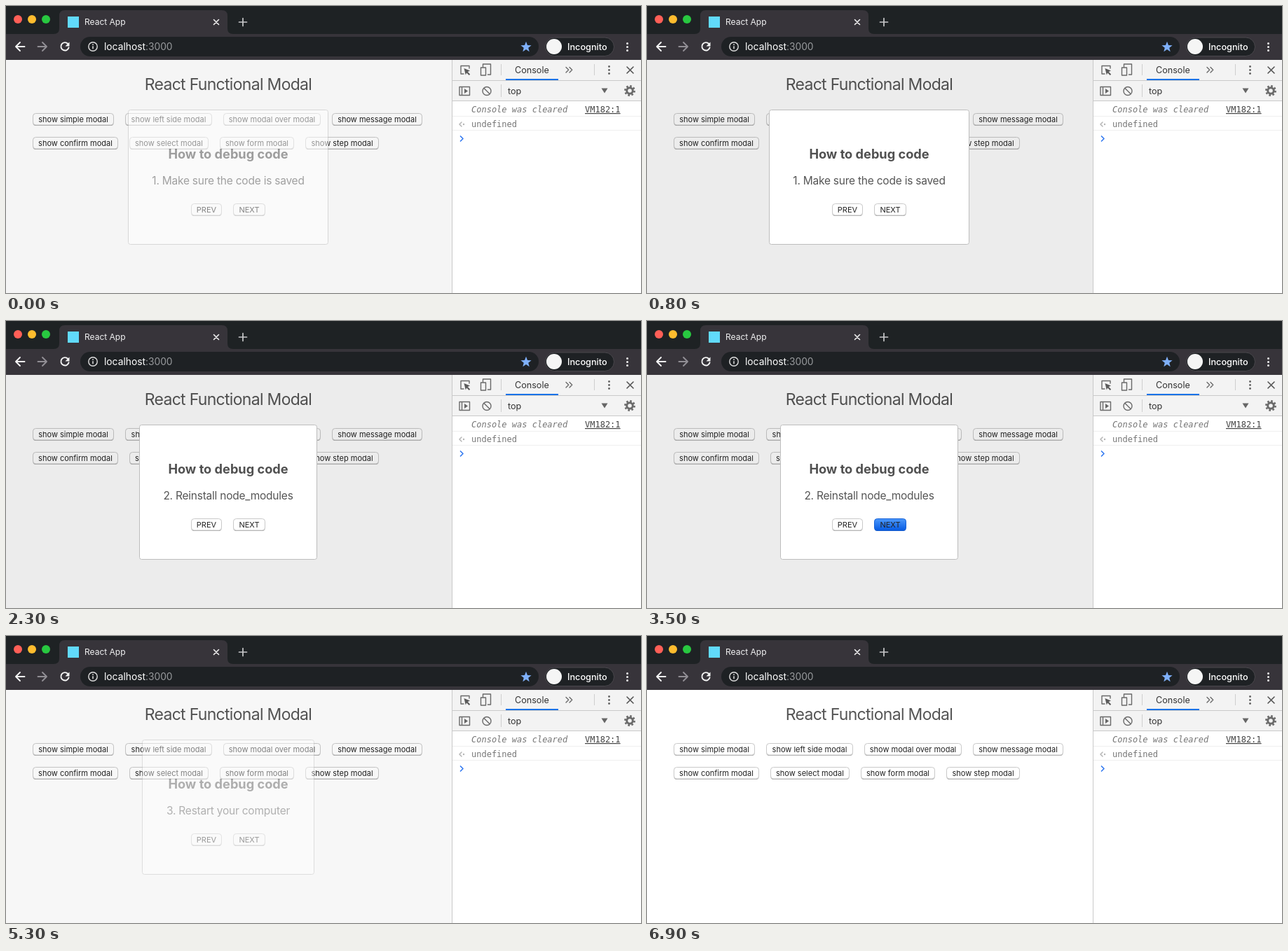
Write an HTML page that moves like this. It is 906 px wide and 410 px high and loops after 7.5 s.

```html
<!DOCTYPE html>
<html lang="en">
<head>
<meta charset="utf-8">
<title>Modal demo</title>
<style>
  html, body { margin: 0; width: 100%; height: 100%; overflow: hidden; background: #fff; }
  svg { display: block; width: 906px; height: 410px; }
  text { font-family: Inter, Roboto, sans-serif; white-space: pre; }
  .mid { text-anchor: middle; }
  .title { font-size: 23px; letter-spacing: -.7px; fill: #555; }
  .head { font-size: 18.2px; font-weight: 700; fill: #505050; }
  .step { font-size: 15.5px; letter-spacing: -.23px; fill: #555; }
  .label { font-size: 11px; fill: #222; }
  .dev { font-size: 12.6px; fill: #333; }
  .mono { font: 12px "DejaVu Sans Mono", monospace; fill: #757575; }
  .line { fill: none; stroke-linecap: round; stroke-linejoin: round; }
</style>
</head>
<body>
<svg viewBox="0 0 906 410">
  <defs>
    <linearGradient id="blue" x2="0" y2="1">
      <stop stop-color="#4b98fb"/><stop offset="1" stop-color="#075be3"/>
    </linearGradient>
  </defs>

  <!-- Page -->
  <rect width="906" height="410" fill="#fff"/>
  <text class="title mid" x="317" y="120">React Functional Modal</text>
  <g id="buttons"></g>
  <rect id="shade" y="77" width="636" height="333"/>
  <g id="modal">
    <rect id="box" y="148.5" height="192" rx="3" fill="#fff" stroke="#bdbdbd"/>
    <text class="head mid" x="317" y="218">How to debug code</text>
    <text id="step" class="step mid" x="317" y="255"></text>
    <g id="prev"></g>
    <g id="next"></g>
  </g>

  <!-- Browser chrome -->
  <rect width="906" height="77" fill="#1e2224"/>
  <rect y="40" width="906" height="37" fill="#37343a"/>
  <path d="M68 40q8 0 8-8V14q0-8 8-8H308q8 0 8 8V32q0 8 8 8z" fill="#37343a"/>
  <circle cx="17" cy="19" r="6" fill="#ff5f57"/>
  <circle cx="37" cy="19" r="6" fill="#febc2e"/>
  <circle cx="57" cy="19" r="6" fill="#28c840"/>
  <rect x="88" y="15" width="16" height="16" fill="#61dafb"/>
  <text x="112" y="27" font-size="12" fill="#f1f1f2">React App</text>
  <path class="line" d="M296.5 19.5l7 7m0-7l-7 7" stroke="#f0f0f0" stroke-width="1.6"/>
  <path class="line" d="M332.500 23h11M338 17.500v11" stroke="#c8c8ca" stroke-width="1.7"/>
  <path class="line" d="M26.500 58h-12.500m6-6l-6 6 6 6" stroke="#f4f4f4" stroke-width="1.9"/>
  <path class="line" d="M45.500 58h12.500m-6-6l6 6-6 6" stroke="#918e94" stroke-width="1.9"/>
  <path class="line" d="M88.300 54a5.700 5.700 0 1 0 1.300 5.300" stroke="#f4f4f4" stroke-width="1.9"/>
  <path d="M90.500 51.500v6h-6z" fill="#f4f4f4"/>
  <rect x="106" y="44" width="654" height="28" rx="14" fill="#1e2124"/>
  <circle cx="124" cy="58" r="6.200" fill="none" stroke="#e0e0e0" stroke-width="1.4"/>
  <path d="M124 57.200v4M124 54.300v1.600" stroke="#e0e0e0" stroke-width="1.500"/>
  <text x="140" y="63" font-size="13.8" fill="#fff">localhost<tspan fill="#989a9d">:3000</tspan></text>
  <path id="star" fill="#7fb0fa"/>
  <rect x="769.500" y="45" width="98" height="26.500" rx="13.200" fill="#1e2124" stroke="#4a484d"/>
  <circle cx="782" cy="58" r="11" fill="#f5f5f5"/>
  <text x="801" y="63" font-size="12.7" font-weight="500" fill="#fff">Incognito</text>
  <g id="menu" fill="#f0f0f0"></g>

  <!-- Developer tools -->
  <rect x="636" y="77" width="270" height="333" fill="#fff"/>
  <rect x="637" y="77" width="269" height="59" fill="#f3f3f3"/>
  <path d="M636.500 77v333M637 106.500h269M637 135.500h269" stroke="#c9c9c9"/>
  <path d="M706.500 83v16M839.500 83v16M706.500 112v18" stroke="#cfcfcf"/>
  <path d="M637 157.500h269M637 177.500h269" stroke="#efefef"/>
  <rect x="713" y="104" width="75" height="2" fill="#1a73e8"/>
  <text class="dev" x="726" y="96">Console</text>
  <text class="dev" x="716" y="126">top</text>
  <g class="line" stroke="#6a6a6a" stroke-width="1.400">
    <path d="M653 97h-4V85.500h12V89"/>
    <path d="M680.500 87v-4h11v15h-4M677.500 88h7v11h-7z"/>
    <path d="M799 87.500l3.700 3.700-3.700 3.700m5-7.400l3.700 3.700-3.700 3.700"/>
    <path d="M886 87l9 9m0-9l-9 9" stroke="#555" stroke-width="1.600"/>
    <path d="M647 115.500h14.500v12H647zM650.500 115.500v12"/>
    <circle cx="686" cy="121.500" r="6"/>
    <path d="M682 117.500l8 8"/>
    <circle cx="890" cy="121" r="4.300" stroke-width="3"/>
    <circle cx="890" cy="121" r="6.600" stroke-width="2.600" stroke-dasharray="2.600 2.580" stroke-linecap="butt"/>
  </g>
  <path d="M653.500 89l8.500 3.500-3.300 1.500 3.500 3.500-1.500 1.400-3.500-3.500-1.400 3z" fill="#5a5a5a"/>
  <path d="M654 118l5 3.500-5 3.500zM849.500 117.500h9l-4.500 7z" fill="#666"/>
  <g id="devMenu" fill="#606060"></g>
  <text class="mono" x="664" y="152" font-style="italic" style="font-style:italic">Console was cleared</text>
  <text class="mono" x="826" y="152" style="fill:#444;text-decoration:underline">VM182:1</text>
  <text class="mono" x="664" y="173">undefined</text>
  <path class="line" d="M650 166l-3 3 3 3" stroke="#b5b5b5" stroke-width="1.500"/>
  <circle cx="653" cy="169" r="1.200" fill="#b5b5b5"/>
  <path class="line" d="M648.500 186l3.500 3.500-3.500 3.500" stroke="#367cf1" stroke-width="1.700"/>
</svg>

<script>
const $ = id => document.getElementById(id);

function button(x, y, width, label, pressed = false) {
  const face = pressed ? 'fill="url(#blue)" stroke="#1762d8"' : 'fill="#fff" stroke="#c9c9c9"';
  const edge = pressed ? '#0b50c4' : '#a4a4a4';
  return `<rect x="${x + .5}" y="${y + 1}" width="${width - 1}" height="17" rx="4" fill="${edge}"/>
    <rect x="${x + .5}" y="${y + .5}" width="${width - 1}" height="16.5" rx="4" ${face}/>
    <text class="label mid" x="${x + width / 2}" y="${y + 13}">${label}</text>`;
}

function buttonRow(y, items) {
  let x = 38;
  return items.map(([name, width]) => {
    const html = button(x, y, width, `show ${name} modal`);
    x += width + 16;
    return html;
  }).join('');
}

const dots = (x, y, gap, r) =>
  [-gap, 0, gap].map(d => `<circle cx="${x}" cy="${y + d}" r="${r}"/>`).join('');

function starPath(cx, cy, outer, inner) {
  const points = Array.from({ length: 10 }, (_, i) => {
    const r = i % 2 ? inner : outer, a = i * Math.PI / 5 - Math.PI / 2;
    return `${cx + r * Math.cos(a)} ${cy + r * Math.sin(a)}`;
  });
  return `M${points.join('L')}z`;
}

// The message button breaks the naming pattern only in width.
$('buttons').innerHTML =
  buttonRow(153, [['simple', 116], ['left side', 124], ['modal over', 139], ['message', 129]])
    .replace('show modal over modal', 'show modal over modal') +
  buttonRow(187, [['confirm', 122], ['select', 113], ['form', 106], ['step', 105]]);
$('menu').innerHTML = dots(886.5, 58.5, 5, 1.5);
$('devMenu').innerHTML = dots(860.5, 91.5, 5, 1.4);
$('star').setAttribute('d', starPath(742, 58.7, 8, 3.4));
$('prev').innerHTML = button(264, 282, 44, 'PREV');

const LOOP = 7500, TICK = 100, FADE = 200;
const FADE_IN = -106, FADE_OUT = 5186;
const steps = [
  { until: 2100, press: 2000, width: 285, text: '1. Make sure the code is saved' },
  { until: 3900, press: 3400, width: 253, text: '2. Reinstall node_modules' },
  { until: LOOP, press: 4800, release: 5200, width: 245, text: '3. Restart your computer' }
];
const clamp = v => Math.min(1, Math.max(0, v));

function render(t) {
  const opacity = Math.min(clamp((t - FADE_IN) / FADE), clamp(1 - (t - FADE_OUT) / FADE));
  const step = steps.find(s => t < s.until);
  const pressed = t >= step.press && t < (step.release || step.until);

  $('shade').setAttribute('opacity', .075 * opacity);
  $('modal').setAttribute('opacity', opacity);
  $('box').setAttribute('x', 317 - step.width / 2);
  $('box').setAttribute('width', step.width);
  $('step').textContent = step.text;
  $('next').innerHTML = button(324, 282, 46, 'NEXT', pressed);
}

const start = performance.now();
function loop() {
  const t = (performance.now() - start) % LOOP;
  render(Math.floor(t / TICK) * TICK);
  requestAnimationFrame(loop);
}
loop();
</script>
</body>
</html>
```
